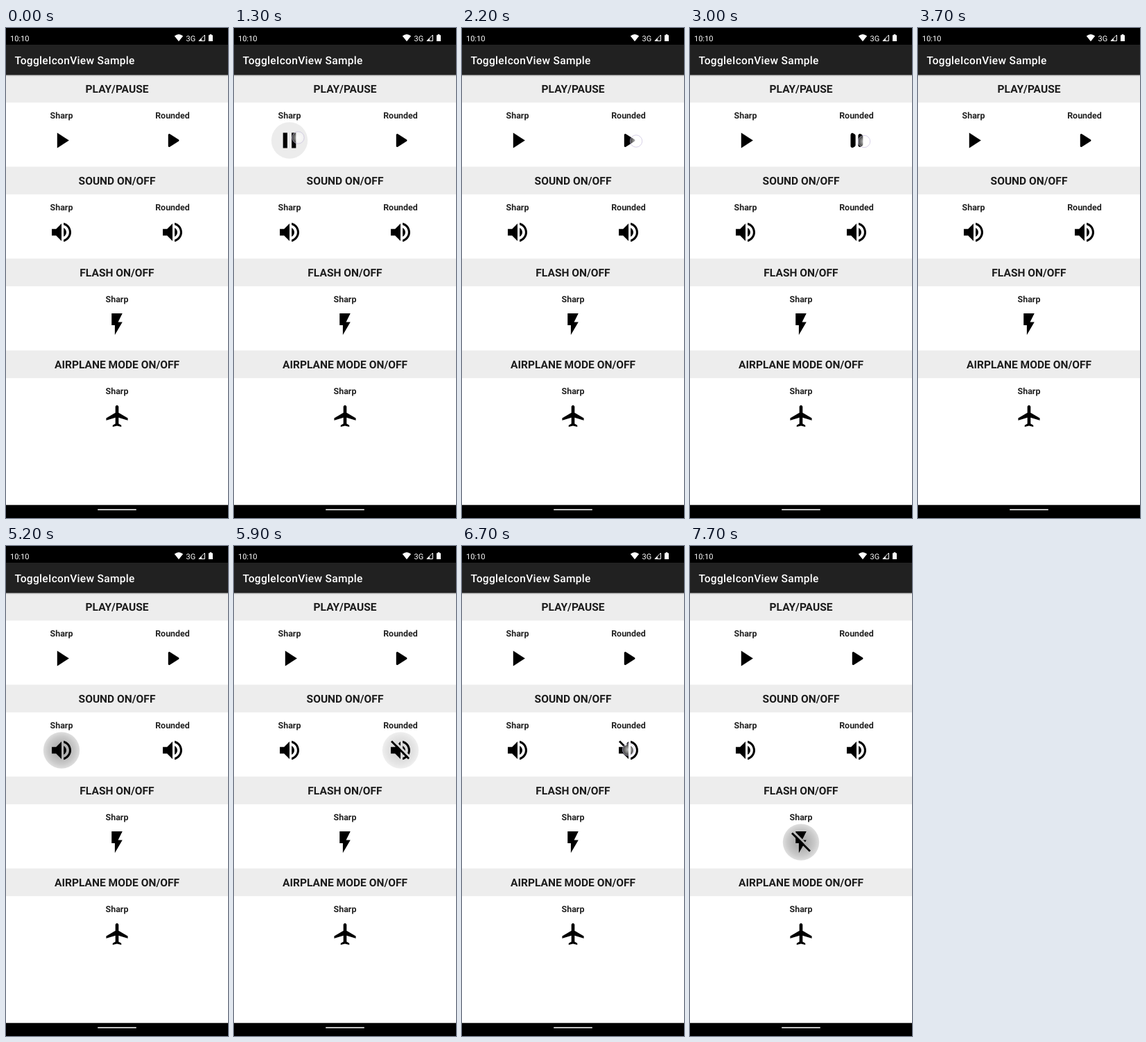
Write an HTML page that moves like this. It is 320 px wide and 704 px high and loops after 8000 ms.

```html
<!DOCTYPE html>
<html lang="en">
<head>
<meta charset="utf-8">
<title>ToggleIconView Sample</title>
<style>
  html, body { margin: 0; width: 100%; height: 100%; overflow: hidden; background: #fff; }
  svg { display: block; width: 320px; height: 704px; font-family: Roboto, sans-serif; text-rendering: geometricPrecision; }
  .header { font-size: 15.56px; font-weight: 700; fill: #1c1c1c; text-anchor: middle; }
  .label { font-size: 12.44px; font-weight: 700; fill: #212121; text-anchor: middle; }
  .title { font-size: 15.56px; font-weight: 500; letter-spacing: .3px; fill: #fff; }
  .status { font-size: 11px; fill: #fff; }
</style>
</head>
<body>
<svg id="stage" viewBox="0 0 320 704">
  <defs>
    <radialGradient id="soft">
      <stop offset=".35" stop-opacity=".3"/>
      <stop offset=".75" stop-opacity=".21"/>
      <stop offset="1" stop-opacity=".13"/>
    </radialGradient>
    <radialGradient id="touch">
      <stop offset="0" stop-color="#fff" stop-opacity=".8"/>
      <stop offset="1" stop-color="#fff" stop-opacity=".25"/>
    </radialGradient>
    <linearGradient id="shadow" x2="0" y2="1">
      <stop offset="0" stop-opacity=".25"/>
      <stop offset="1" stop-opacity="0"/>
    </linearGradient>
  </defs>
  <rect width="320" height="704" fill="#fff"/>
  <g id="content"></g>
  <rect y="67" width="320" height="3" fill="url(#shadow)"/>
  <rect width="320" height="24"/>
  <rect y="24" width="320" height="43.5" fill="#212121"/>
  <text class="status" x="6" y="18.5">10:10</text>
  <path d="M242.8 11.6Q249 6.6 255.2 11.6L249 19.2Z" fill="#fff"/>
  <text class="status" x="259.5" y="18.5">3G</text>
  <path d="M286.5 10V18.5H278Z" fill="none" stroke="#fff"/>
  <path d="M278 18.5L282 14.5V18.5Z" fill="#fff"/>
  <path d="M292 10.2H293.7V9H296.3V10.2H298V19H292Z" fill="#fff"/>
  <text class="title" x="12.5" y="52">ToggleIconView Sample</text>
  <rect y="685.3" width="320" height="18.7"/>
  <rect x="132" y="691.2" width="56" height="1.6" rx=".8" fill="#fff"/>
  <circle id="pointer" r="8.7" fill="url(#touch)" stroke="#c2b8da" stroke-opacity=".65"/>
</svg>
<script>
const LOOP = 8000, STEP = 100, MORPH = 300;
const SCALE = 37.33 / 24;
const content = document.getElementById('content');
const pointer = document.getElementById('pointer');

const SPEAKER = 'M3 9v6h4l5 5V4L7 9H3z' +
  'M16.5 12c0-1.77-1.02-3.29-2.5-4.03v8.05c1.48-.73 2.5-2.25 2.5-4.02z' +
  'M14 3.23v2.06c2.89.86 5 3.54 5 6.71s-2.11 5.85-5 6.71v2.06c4.01-.91 7-4.49 7-8.77s-2.99-7.86-7-8.77z';
const BOLT = 'M7 2v11h3v9l7-12h-4l4-8z';
const PLANE = 'M22 16v-2l-8.5-5V3.5c0-.83-.67-1.5-1.5-1.5s-1.5.67-1.5 1.5V9L2 14v2l8.5-2.5V19' +
  'L8 20.5V22l4-1 4 1v-1.5L13.5 19v-5.5z';

// Each shape is two quads [x1, top1, x2, top2], mirrored about y = 12, plus an outline width.
const SHARP = {
  play: { quads: [[8, 5, 13.5, 8.5], [13.2, 8.31, 19, 12]], outline: 0 },
  pause: { quads: [[6, 5, 10, 5], [14, 5, 18, 5]], outline: 0 }
};
const ROUND = {
  play: { quads: [[9, 6.9, 13.3, 9.6], [13.3, 9.6, 17.1, 12]], outline: 2 },
  pause: { quads: [[8, 7, 8, 7], [16, 7, 16, 7]], outline: 4 }
};

function add(parent, tag, attrs, text) {
  const node = document.createElementNS('http://www.w3.org/2000/svg', tag);
  for (const key in attrs) node.setAttribute(key, attrs[key]);
  if (text) node.textContent = text;
  return parent.appendChild(node);
}

const clamp = x => Math.max(0, Math.min(1, x));
const mix = (a, b, k) => a + (b - a) * k;
const smooth = x => x * x * (3 - 2 * x);
const easeOut = x => 1 - (1 - x) ** 3;

function playIcon(group, { play, pause }) {
  const path = add(group, 'path', { stroke: '#000', 'stroke-linejoin': 'round' });
  return progress => {
    const k = smooth(progress);
    path.setAttribute('stroke-width', mix(play.outline, pause.outline, k));
    path.setAttribute('d', play.quads.map((quad, i) => {
      const [x1, y1, x2, y2] = quad.map((v, j) => mix(v, pause.quads[i][j], k));
      return `M${x1} ${y1}V${24 - y1}L${x2} ${24 - y2}V${y2}Z`;
    }).join(''));
  };
}

let maskCount = 0;
function slashIcon(group, shape) {
  const id = 'cut' + maskCount++;
  const mask = add(group, 'mask', { id, maskUnits: 'userSpaceOnUse', x: 0, y: 0, width: 24, height: 24 });
  add(mask, 'rect', { width: 24, height: 24, fill: '#fff' });
  const gap = add(mask, 'path', { stroke: '#000', 'stroke-width': 2 });
  add(group, 'path', { d: shape, mask: `url(#${id})` });
  const slash = add(group, 'path', { stroke: '#000', 'stroke-width': 1.8 });
  return (progress, leaving) => {
    const k = leaving ? 1 - easeOut(1 - progress) : easeOut(progress);
    const end = mix(3.64, 20.36, k);
    slash.setAttribute('d', `M3.64 3.64L${end} ${end}`);
    gap.setAttribute('d', `M4.94 2.34L${end + 1.3} ${end - 1.3}`);
    for (const line of [slash, gap]) line.setAttribute('visibility', k > 0 ? 'visible' : 'hidden');
  };
}

// A tap: done = toggle finished, solid = ripple evens out, gone = ripple faded,
// press = time of touch before done, dx/dy = touch offset from the icon centre.
const tap = (done, solid, gone, press, dx, dy) => ({ done, solid, gone, press, dx, dy });

function cell(x, y, label, build, taps = []) {
  add(content, 'text', { class: 'label', x, y: y - 31.5 }, label);
  const ripple = add(content, 'circle', { cx: x, cy: y, r: 26.2 });
  const group = add(content, 'g', { transform: `translate(${x - 12 * SCALE} ${y - 12 * SCALE}) scale(${SCALE})` });
  return { x, y, taps, ripple, draw: build(group) };
}

['PLAY/PAUSE', 'SOUND ON/OFF', 'FLASH ON/OFF', 'AIRPLANE MODE ON/OFF'].forEach((name, i) => {
  add(content, 'rect', { y: 67.3 + 132 * i, width: 320, height: 39.8, fill: '#ededed' });
  add(content, 'text', { class: 'header', x: 160, y: 93.2 + 132 * i }, name);
});

const cells = [
  cell(80, 161.5, 'Sharp', g => playIcon(g, SHARP), [
    tap(900, 1100, 1370, 300, 12, -3), tap(1700, 1900, 2200, 400, 12.5, -4)]),
  cell(240, 161.5, 'Rounded', g => playIcon(g, ROUND), [
    tap(2500, 2800, 3000, 300, 11, 1), tap(3200, 3500, 3700, 300, 11, 1.5)]),
  cell(80, 293.5, 'Sharp', g => slashIcon(g, SPEAKER), [
    tap(4300, 4600, 4900, 300, 2, 0), tap(5200, 5500, 5850, 300, 2, 0)]),
  cell(240, 293.5, 'Rounded', g => slashIcon(g, SPEAKER), [
    tap(6000, 6300, 6600, 300, 0, -1), tap(6900, 7100, 7400, 300, 0, -1)]),
  cell(160, 425.5, 'Sharp', g => slashIcon(g, BOLT), [tap(7700, 8000, 8300, 300, 2, 1)]),
  cell(160, 557.5, 'Sharp', g => { add(g, 'path', { d: PLANE }); return () => {}; })
];

function drawRipple(ripple, taps, t) {
  const active = taps.find(a => t >= a.done - 100 && t < a.gone);
  ripple.setAttribute('visibility', active ? 'visible' : 'hidden');
  if (!active) return;
  const { done, solid, gone } = active;
  const even = t >= solid;
  ripple.setAttribute('fill', even ? 'rgba(0,0,0,.16)' : 'url(#soft)');
  ripple.setAttribute('opacity', even ? 1 - ((t - solid) / (gone - solid)) ** 2 : clamp((t - done + 200) / 200));
}

function render(now) {
  const t = Math.floor(now % LOOP / STEP) * STEP;
  let touched = false;
  for (const { x, y, taps, ripple, draw } of cells) {
    const [first, second] = taps.map(a => clamp((t - a.done + MORPH) / MORPH));
    draw((first || 0) - (second || 0), second > 0);
    drawRipple(ripple, taps, t);
    for (const { done, press, dx, dy } of taps) {
      if (t < done - press || t >= done - 150) continue;
      touched = true;
      pointer.setAttribute('cx', x + dx);
      pointer.setAttribute('cy', y + dy);
    }
  }
  pointer.setAttribute('visibility', touched ? 'visible' : 'hidden');
}

const start = performance.now();
function tick() {
  render(performance.now() - start);
  requestAnimationFrame(tick);
}
tick();
</script>
</body>
</html>
```
